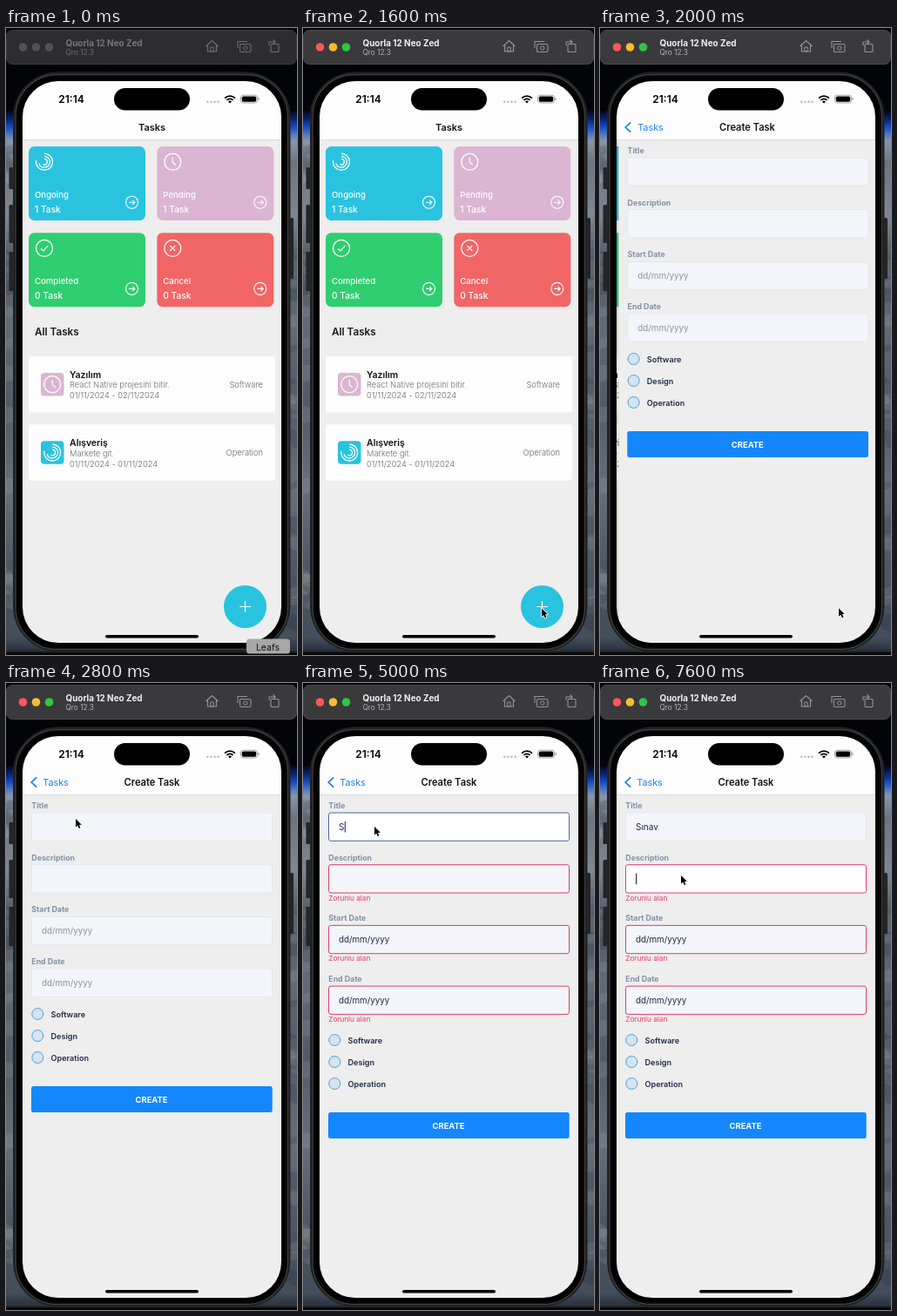
An HTML page with a canvas that plays this animation: 334x720 px, repeating every 8000 ms.

```html
<!DOCTYPE html>
<html lang="en">
<head>
<meta charset="utf-8">
<title>Task app demo</title>
<style>
  html, body { margin: 0; width: 100%; height: 100%; overflow: hidden; background: #000; }
  canvas { display: block; width: 334px; height: 720px; }
</style>
</head>
<body>
<canvas id="stage"></canvas>
<script>
const W = 334, H = 720, LOOP = 8000, STEP = 200;
const SCREEN = { x: 19, y: 61, w: 297, h: 645 };
const BLUE = '#29c3df', PINK = '#dbb5d2', GREEN = '#2fce70', RED = '#f16567';
const INK = '#222b45', LABEL = '#8490aa', HINT = '#8d939f', DANGER = '#e23d68', LINK = '#1a7fe8';

const canvas = document.getElementById('stage');
const ctx = canvas.getContext('2d');
const dpr = window.devicePixelRatio || 1;
canvas.width = W * dpr;
canvas.height = H * dpr;

const clamp = v => Math.max(0, Math.min(1, v));
const mix = (a, b, k) => a + (b - a) * k;
const rad = deg => deg * Math.PI / 180;

function box(x, y, w, h, r, fill, stroke, lw = 1) {
  ctx.beginPath();
  ctx.roundRect(x, y, w, h, r);
  if (fill) { ctx.fillStyle = fill; ctx.fill(); }
  if (stroke) { ctx.strokeStyle = stroke; ctx.lineWidth = lw; ctx.stroke(); }
}

function disc(x, y, r, fill, stroke, lw = 1) {
  ctx.beginPath();
  ctx.arc(x, y, r, 0, Math.PI * 2);
  if (fill) { ctx.fillStyle = fill; ctx.fill(); }
  if (stroke) { ctx.strokeStyle = stroke; ctx.lineWidth = lw; ctx.stroke(); }
}

function line(color, lw, ...pts) {
  ctx.beginPath();
  for (let i = 0; i < pts.length; i += 2) ctx.lineTo(pts[i], pts[i + 1]);
  ctx.strokeStyle = color;
  ctx.lineWidth = lw;
  ctx.stroke();
}

function arc(x, y, r, from, to, color, lw) {
  ctx.beginPath();
  ctx.arc(x, y, r, rad(from), rad(to));
  ctx.strokeStyle = color;
  ctx.lineWidth = lw;
  ctx.stroke();
}

function text(str, x, y, size, weight, color, align = 'left') {
  ctx.font = `${weight} ${size}px Inter, "Open Sans", sans-serif`;
  ctx.textAlign = align;
  ctx.fillStyle = color;
  ctx.fillText(str, x, y);
  return ctx.measureText(str).width;
}

// Critically damped push: 1 before the start, 0 when settled.
function pushLeft(t) {
  const s = Math.max(0, t - 1615) * 0.018;
  const r = (1 + s) * Math.exp(-s);
  return r < 0.004 ? 0 : r;
}

const path = [[200, 294, 722], [400, 290, 712], [800, 274, 667], [2200, 274, 666],
  [2400, 205, 470], [2600, 96, 215], [2800, 80, 156], [3000, 80, 156],
  [3200, 82, 165], [6600, 82, 165], [7000, 93, 221], [8000, 93, 221]];

function cursorAt(t) {
  if (t < path[0][0]) return null;
  let i = 1;
  while (i < path.length - 1 && path[i][0] < t) i++;
  const [t0, x0, y0] = path[i - 1], [t1, x1, y1] = path[i];
  const k = clamp((t - t0) / (t1 - t0));
  return [mix(x0, x1, k), mix(y0, y1, k)];
}

const WORD = 'Sınav', KEYS = [4700, 5150, 5350, 5550, 5700];
const TITLE_FOCUS = 3600, DESC_FOCUS = 7350;

function formState(t) {
  const count = KEYS.filter(k => k <= t).length;
  const focus = t >= DESC_FOCUS ? 1 : t >= TITLE_FOCUS ? 0 : -1;
  const edit = focus === 1 ? DESC_FOCUS : count ? KEYS[count - 1] : TITLE_FOCUS;
  return { title: WORD.slice(0, count), errors: count > 0, focus, caret: (t - edit) % 1000 < 500 };
}

function wallpaper() {
  const g = ctx.createLinearGradient(0, 0, 0, H);
  [[0, '#030305'], [94, '#03040a'], [104, '#08206a'], [114, '#1a4cc0'], [122, '#4d78c2'],
   [130, '#8796a8'], [155, '#6b7580'], [215, '#7d8791'], [270, '#4c5661'], [340, '#626c77'],
   [430, '#505b67'], [530, '#66707b'], [620, '#4c5763'], [700, '#434e5a'], [715, '#2a323c'],
   [718, '#060708'], [720, '#000']].forEach(([y, c]) => g.addColorStop(y / H, c));
  ctx.fillStyle = g;
  ctx.fillRect(0, 0, W, H);
  // Soft cloud streaks along both edges
  let seed = 7;
  const rnd = () => (seed = seed * 16807 % 2147483647) / 2147483647;
  for (let i = 0; i < 36; i++) {
    ctx.fillStyle = rnd() > 0.5 ? 'rgba(215,222,230,.1)' : 'rgba(15,24,36,.14)';
    ctx.beginPath();
    ctx.ellipse(i % 2 ? 331 : 3, 140 + rnd() * 560, 6 + rnd() * 6, 3 + rnd() * 10, -0.4, 0, 7);
    ctx.fill();
  }
}

function titleBar(active) {
  box(0.5, 2.5, 333, 39, 7, active ? '#3a393b' : '#2d2c2e', active ? '#4b4a4c' : '#3c3b3d');
  const lights = active ? ['#f9575a', '#f6bd30', '#2dc744'] : ['#525153', '#525153', '#525153'];
  lights.forEach((c, i) => disc(19.5 + i * 15, 22, 4.8, c));
  text('Quorla 12 Neo Zed', 68.5, 20.5, 9.9, 700, active ? '#f2f2f2' : '#777678');
  text('Qro 12.3', 68.5, 31, 8.3, 400, active ? '#b3b2b4' : '#6f6e70');
  const c = active ? '#949395' : '#6f6e70';
  line(c, 1.2, 229.5, 21, 236.5, 14.5, 243.5, 21);
  line(c, 1.2, 231.5, 20, 231.5, 27, 241.5, 27, 241.5, 20);
  box(234.8, 22, 3.4, 5, 0, null, c);
  line(c, 1.1, 266, 23, 266, 15.5, 277, 15.5);
  box(268.5, 18.5, 12.5, 9, 1.5, null, c, 1.1);
  disc(274.8, 23, 2.2, null, c);
  box(304, 18.5, 9, 9, 1, null, c, 1.1);
  line(c, 1.1, 302, 20, 302, 16, 309, 16);
  line(c, 1.1, 306.5, 13.5, 309, 16, 306.5, 18.5);
}

function phone() {
  [[160, 25], [203, 44], [257, 45]].forEach(([y, h]) => box(3.5, y, 6, h, 1.5, '#242527'));
  box(325, 218, 5, 70, 1.5, '#242527');
  box(8.5, 51, 317.5, 665, 51, '#1a1a1c', '#29292b');
  box(11, 53.5, 312.5, 660, 48, '#060607', '#3f3f42', 1.3);
  box(15, 57, 305, 653, 45, '#000');
}

function ringIcon(x, y) {
  [[9.5, 190], [6.4, 165], [3.3, 120]].forEach(([r, end]) => arc(x, y, r, -90, end, '#fff', 1.3));
}

function clockIcon(x, y) {
  disc(x, y, 9.5, null, '#fff', 1.3);
  line('#fff', 1.2, x, y - 5.5, x, y + 0.5, x + 3.5, y + 3.5);
}

function checkIcon(x, y) {
  disc(x, y, 9.5, null, '#fff', 1.3);
  line('#fff', 1.3, x - 4, y + 0.5, x - 1, y + 3, x + 4.2, y - 2.8);
}

function crossIcon(x, y) {
  disc(x, y, 9.5, null, '#fff', 1.3);
  line('#fff', 1.3, x - 3, y - 3, x + 3, y + 3);
  line('#fff', 1.3, x + 3, y - 3, x - 3, y + 3);
}

function statCard(x, y, color, icon, label, count) {
  box(x, y, 134, 85, 6.5, color);
  icon(x + 18, y + 17.7);
  text(label, x + 7, y + 59.2, 9.6, 500, '#fff');
  text(`${count} Task`, x + 7, y + 75.7, 10.2, 500, '#fff');
  const ax = x + 118.5, ay = y + 64.2;
  disc(ax, ay, 7, null, '#fff', 1.1);
  line('#fff', 1.1, ax - 3.5, ay, ax + 3.3, ay);
  line('#fff', 1.1, ax + 0.8, ay - 2.6, ax + 3.4, ay, ax + 0.8, ay + 2.6);
}

function taskRow(y, color, icon, name, note, dates, kind) {
  box(26, y, 283, 64.5, 3, '#fdfdfd');
  box(40, y + 19, 26.5, 26.5, 4, color);
  icon(53.2, y + 32.2);
  text(name, 73, y + 24.5, 10.5, 600, '#111');
  text(note, 73, y + 36.3, 9.35, 300, '#6e6e6e');
  text(dates, 73, y + 48.3, 9.25, 300, '#666');
  text(kind, 295, y + 35.5, 9.3, 300, '#6a6a6a', 'right');
}

function taskList() {
  ctx.fillStyle = '#eee';
  ctx.fillRect(SCREEN.x, 128, SCREEN.w, 580);
  statCard(26, 136, BLUE, ringIcon, 'Ongoing', 1);
  statCard(173.3, 136, PINK, clockIcon, 'Pending', 1);
  statCard(26, 235.2, GREEN, checkIcon, 'Completed', 0);
  statCard(173.3, 235.2, RED, crossIcon, 'Cancel', 0);
  text('All Tasks', 33, 353, 11.7, 600, '#151515');
  taskRow(377, PINK, clockIcon, 'Yazılım', 'React Native projesini bitir.', '01/11/2024 - 02/11/2024', 'Software');
  taskRow(455.3, BLUE, ringIcon, 'Alışveriş', 'Markete git.', '01/11/2024 - 01/11/2024', 'Operation');
  disc(274.5, 664.5, 24.5, BLUE);
  line('#fff', 1.2, 268, 664.5, 281, 664.5);
  line('#fff', 1.2, 274.5, 658, 274.5, 671);
}

function createForm(s) {
  ctx.fillStyle = '#eee';
  ctx.fillRect(SCREEN.x, 128, SCREEN.w, 580);
  let y = 149;
  ['Title', 'Description', 'Start Date', 'End Date'].forEach((label, i) => {
    const focused = s.focus === i, bad = s.errors && i > 0, date = i > 1;
    text(label, 29.3, y - 5, 8.8, 700, LABEL);
    const border = bad ? DANGER : focused ? '#4863b8' : '#e2e7f1';
    box(29.5, y, 276, 32.3, 2.5, focused ? '#fff' : '#f3f5fb', border);
    const value = i === 0 ? s.title : date ? 'dd/mm/yyyy' : '';
    const color = date && !s.errors ? HINT : INK;
    const w = text(value, 41, y + 20, date ? 9.8 : 10, 400, color);
    if (focused && s.caret) {
      ctx.fillStyle = i ? '#3c3c48' : '#46479a';
      ctx.fillRect(41 + w + (w ? 0.3 : 0), y + 10, 1.3, 12.5);
    }
    if (bad) {
      text('Zorunlu alan', 29.3, y + 41, 8.2, 400, DANGER);
      y += 10;
    }
    y += 59.7;
  });
  y -= 7.8;
  ['Software', 'Design', 'Operation'].forEach((label, i) => {
    const cy = y + i * 25;
    disc(36.3, cy, 6.5, '#d6e4ee', '#46a2e0');
    text(label, 51.5, cy + 3.5, 9.1, 600, INK);
  });
  box(29, y + 83, 276.7, 30, 2.5, '#1487ff');
  text('CREATE', 167, y + 101.5, 9.4, 700, '#fff', 'center');
}

function statusBar() {
  text('21:14', 75, 86.3, 12, 600, '#000', 'center');
  box(124, 69, 87, 25.5, 12.75, '#000');
  for (let i = 0; i < 4; i++) disc(231.3 + i * 4.1, 84.8, 1.2, '#b9b9b9');
  ctx.beginPath();
  ctx.moveTo(257, 86.5);
  ctx.arc(257, 86.5, 2.8, rad(-135), rad(-45));
  ctx.fillStyle = '#000';
  ctx.fill();
  arc(257, 86.5, 5.1, -135, -45, '#000', 1.8);
  arc(257, 86.5, 8.4, -135, -45, '#000', 1.8);
  box(269.5, 77.2, 19, 8.8, 2.8, null, '#999', 0.9);
  box(270.8, 78.5, 16.4, 6.2, 1.7, '#000');
  box(289.4, 80, 1.2, 3.2, 0.6, '#999');
}

function header(r) {
  ctx.fillStyle = '#fdfdfd';
  ctx.fillRect(SCREEN.x, SCREEN.y, SCREEN.w, 67);
  ctx.fillStyle = '#d3d3d3';
  ctx.fillRect(SCREEN.x, 128, SCREEN.w, 0.7);
  statusBar();
  if (r === 1) {
    text('Tasks', 167.5, 118, 11, 600, '#111', 'center');
    return;
  }
  const p = 1 - r;
  ctx.globalAlpha = p;
  line(LINK, 1.7, 35.2, 108.3, 29.2, 114, 35.2, 119.7);
  // Titles fade in more slowly than the chevron
  ctx.globalAlpha = p * p;
  text('Create Task', 167.5 + 197 * r, 118, 11.1, 600, '#111', 'center');
  text('Tasks', 57 + 125 * r, 118, 10.8, 400, LINK, 'center');
  ctx.globalAlpha = 1;
}

function app(t) {
  const r = pushLeft(t);
  ctx.save();
  ctx.beginPath();
  ctx.roundRect(SCREEN.x, SCREEN.y, SCREEN.w, SCREEN.h, 41);
  ctx.clip();
  if (r > 0) {
    ctx.save();
    ctx.translate(-0.3 * SCREEN.w * (1 - r), 0);
    taskList();
    ctx.restore();
    if (r < 1) {
      ctx.fillStyle = `rgba(0,0,0,${0.1 * (1 - r)})`;
      ctx.fillRect(SCREEN.x, 128, SCREEN.w, 580);
    }
  }
  if (r < 1) {
    ctx.save();
    ctx.translate(SCREEN.w * r, 0);
    createForm(formState(t));
    ctx.restore();
  }
  header(r);
  box(114, 697, 107, 3.6, 1.8, '#000');
  ctx.restore();
}

function pointer(x, y) {
  ctx.save();
  ctx.translate(x, y);
  ctx.scale(0.92, 0.92);
  ctx.beginPath();
  [[0, 0], [0, 10.4], [2.4, 8.2], [4.1, 12], [5.9, 11.2], [4.3, 7.5], [7.4, 7.4]]
    .forEach(p => ctx.lineTo(...p));
  ctx.closePath();
  ctx.lineJoin = 'round';
  ctx.strokeStyle = '#fff';
  ctx.lineWidth = 1.8;
  ctx.stroke();
  ctx.fillStyle = '#000';
  ctx.fill();
  ctx.restore();
}

function draw(t) {
  ctx.setTransform(dpr, 0, 0, dpr, 0, 0);
  wallpaper();
  titleBar(t >= 1400);
  phone();
  app(t);
  if (t < 200) {
    box(276, 701.5, 50, 17, 3.5, '#a7a7a8');
    text('Leafs', 300.5, 714.5, 10.5, 400, '#111', 'center');
  }
  const pos = cursorAt(t);
  if (pos) pointer(...pos);
}

const start = performance.now();
function tick() {
  const t = (performance.now() - start) % LOOP;
  draw(Math.floor(t / STEP) * STEP);
  requestAnimationFrame(tick);
}
tick();
</script>
</body>
</html>
```
